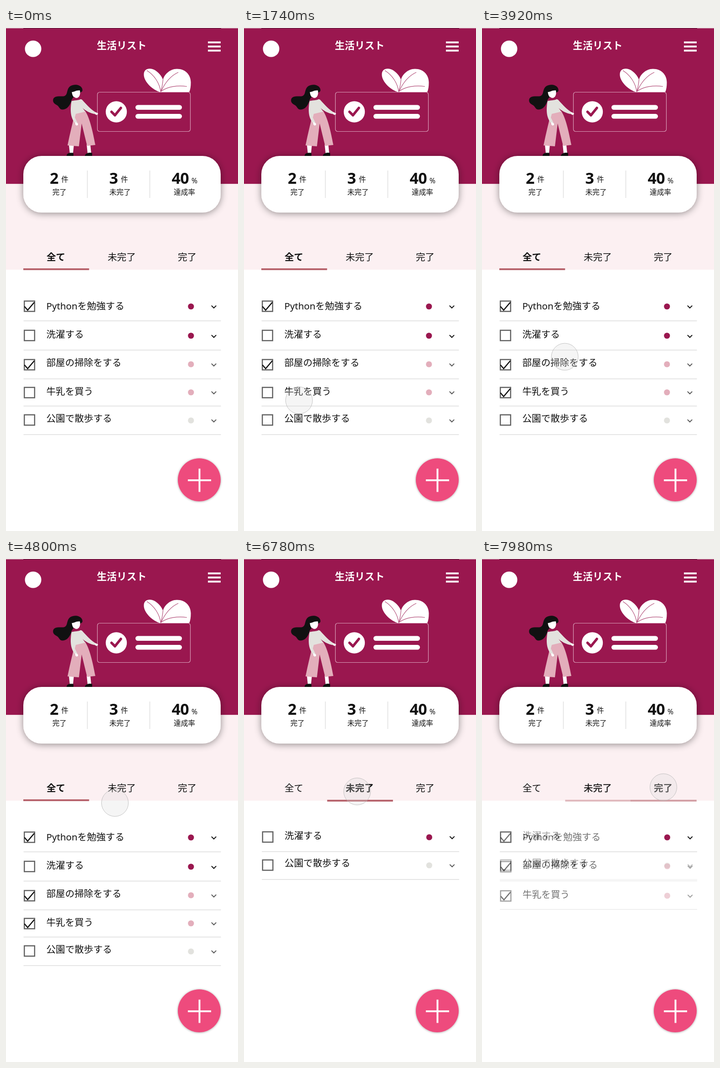
An HTML page that plays this animation: 509 px wide and 1101 px high, repeating every 8 s.

```html
<!DOCTYPE html>
<html lang="ja">
<head>
<meta charset="utf-8">
<title>生活リスト</title>
<style>
html, body { margin: 0; width: 100%; height: 100%; overflow: hidden; background: #fff; }
svg { display: block; width: 100%; height: 100%; }
text { font-family: "Noto Sans", "Noto Sans CJK JP", sans-serif; fill: #111; }
.num { font-size: 34px; font-weight: 700; letter-spacing: -.6px; }
.unit { font-size: 15.7px; }
.item { font-size: 20.6px; }
.bold { font-weight: 700; }
.title { font-size: 21.8px; font-weight: 900; fill: #fff; }
</style>
</head>
<body>
<svg viewBox="0 0 509 1101">
  <defs>
    <filter id="soft" x="-20%" y="-40%" width="140%" height="180%">
      <feDropShadow dx="0" dy="2" stdDeviation="8" flood-color="#000" flood-opacity=".42"/>
    </filter>
    <filter id="near" x="-20%" y="-20%" width="140%" height="140%">
      <feDropShadow dx="0" dy=".5" stdDeviation="2.2" flood-color="#000" flood-opacity=".38"/>
    </filter>
  </defs>

  <!-- header -->
  <rect width="509" height="341.4" fill="#9a174f"/>
  <rect y="341.4" width="509" height="187.6" fill="#fcf0f2"/>
  <rect width="509" height="1" fill="#c9a0b3"/>
  <rect x="38" width="434" height="1" fill="#511a35"/>
  <circle cx="59.5" cy="45.5" r="18" fill="#fff"/>
  <text x="199.3" y="46" class="title">生活リスト</text>
  <path d="M443 31.5h28M443 40.5h28M443 49.5h28" stroke="#fff" stroke-width="4"/>

  <!-- leaves and panel -->
  <g fill="#fff">
    <path d="M339 140.5C322 136 301 117 302.500 100C303.500 88 317 86 328 93C337 99 343 108 344.500 114C346 103 359 89.500 375 89.500C394 89.500 405.500 103 405.500 119C405.500 128 404.500 135 402 140.500Z"/>
    <path d="M309 93C325 103 337 120 339.500 140C343 128 344 120 344.500 113M339.500 140C350 117 362 104 378 97M341 138C355 128 377 125 397 128" fill="none" stroke="#b3507b" stroke-width="1.200"/>
    <rect x="200.500" y="140.500" width="204" height="86" rx="5" fill="#9a174f" stroke="#d9a0b9" stroke-width="1.200"/>
    <circle cx="242" cy="183.500" r="23.200"/>
    <rect x="284" y="168.500" width="102" height="10.500" rx="5.250"/>
    <rect x="284" y="188" width="102" height="10.500" rx="5.250"/>
  </g>
  <path d="M231.500 183.500L239 191L252 175" fill="none" stroke="#9a174f" stroke-width="5.500" stroke-linecap="round" stroke-linejoin="round"/>

  <!-- woman -->
  <path d="M138 255L140 275H147L149 255ZM177 255L179 275H187L185 255Z" fill="#fff"/>
  <path d="M133 280C133 274 139 272.500 148 273.500V280ZM173 280C174 274 181 272 189 273.500V280Z" fill="#111"/>
  <path d="M135.500 135C138 126 148 123 156 124.500C164 126 169 132 167.500 138C165 142 158 142 153 145C150 155 146 158 142 163C139 172 132 179 123 178.500C117 178 117 172 112 169C106 166 102 162 103.500 156C106 148 118 150 126 149.500C134 148 133 142 135.500 135Z" fill="#111"/>
  <path d="M144.500 140C150 140 154 136 162 136.500C164 145 161 153 154 153.500C148 153 145 147 144.500 140Z" fill="#fff"/>
  <path d="M152 184L174 182C184 198 190 225 196 256L178 258L166 209L160 259L135 257C140 232 146 208 152 184Z" fill="#e3aebb"/>
  <path d="M144 158C149 154 161 153 167 157C178 169 186 179 199 185.500L198 189C184 187 173 180 168 175L174 183L153 188L151 196L157 208L153 210C144 200 139 187 144 158Z" fill="#e3e2de"/>
  <path d="M143 160C145 154 148 151 150 151C153 155 160 153 165 155C160 159 149 158 143 160Z" fill="#9a174f"/>
  <path d="M152 206L158 209C159 214 154 215 152 211ZM195 184.500L201 186C203 188 201 191 197 190Z" fill="#fff"/>

  <!-- statistics card -->
  <rect x="38" y="280" width="433" height="124" rx="40" fill="#fff" filter="url(#soft)"/>
  <path d="M178.500 312V372M315.500 312V372" stroke="#dadada" stroke-width="1.300"/>
  <text x="96" y="341.200" class="num">2</text><text x="121.200" y="337" class="unit">件</text>
  <text x="226.500" y="341.200" class="num">3</text><text x="252" y="337" class="unit">件</text>
  <text x="363.500" y="341.200" class="num">40</text><text x="407" y="340" class="unit">%</text>
  <text x="101.700" y="364.500" class="unit">完了</text>
  <text x="226.700" y="364.500" class="unit">未完了</text>
  <text x="368" y="364.500" class="unit">達成率</text>

  <g id="views"></g>

  <!-- add button -->
  <circle cx="424" cy="989" r="47" fill="#ee4c7d" filter="url(#near)"/>
  <path d="M399 990H450M424.500 964.500V1015.500" stroke="#fff" stroke-width="4"/>

  <circle id="touch" r="29.500" fill="#dadada" fill-opacity=".27" stroke="#b4b4b4" stroke-opacity=".8"/>
</svg>
<script>
const LOOP = 8000, FADE = 410;
const WINE = '#9a174f', ROSE = '#e3aebb', GREY = '#e2e2de', INK = '#111', DIM = '#5a5a5a';
const TABS = [['全て', 89, 38, 526], ['未完了', 223, 182.5, 527], ['完了', 377, 326.5, 527]];

const study = ['Pythonを勉強する', WINE, INK];
const wash = ['洗濯する', WINE, INK];
const clean = ['部屋の掃除をする', ROSE, DIM];
const milk = ['牛乳を買う', ROSE, DIM];
const walk = ['公園で散歩する', GREY, DIM];

// x shift, then centres of box, text, dot, chevron and the rule below
function row([label, dot, ink], done, dx, box, mid, dotY, chev, rule) {
  return `<g transform="translate(${dx})">
    <rect x="40.2" y="${box - 11.3}" width="22.6" height="22.6" fill="none" stroke="#626262" stroke-width="2.5"/>
    ${done ? `<path d="M40.5 ${box + .5}L47.5 ${box + 8.5}L62 ${box - 8.5}" fill="none" stroke="${INK}" stroke-width="2.5"/>` : ''}
    <text class="item" x="88.5" y="${mid + 7.5}">${label}</text>
    <circle cx="405.8" cy="${dotY}" r="6.6" fill="${dot}"/>
    <path d="M450.8 ${chev - 2.4}l5.2 5.2l5.2 -5.2" fill="none" stroke="${ink}" stroke-width="2"/>
    <path d="M38.5 ${rule}H471.5" stroke="#dcdcdc" stroke-width="1.5"/>
  </g>`;
}

function view(active, rows) {
  const tabs = TABS.map(([label, x], i) =>
    `<text class="item${i === active ? ' bold' : ''}" x="${x}" y="509">${label}</text>`).join('');
  const [, , x, y] = TABS[active];
  return `<g><rect y="465" width="509" height="64" fill="#fcf0f2"/>
    <rect y="529" width="509" height="375" fill="#fff"/>${tabs}
    <rect x="${x}" y="${y}" width="144.3" height="4" fill="#b8656e"/>${rows.join('')}</g>`;
}

const allRows = milkDone => [
  row(study, true, 0, 609, 608.5, 609.5, 610, 641),
  row(wash, false, 0, 673, 670.5, 673.5, 674.5, 705),
  row(clean, true, 0, 737, 732.5, 736, 737, 768),
  row(milk, milkDone, 0, 798, 795, 797.5, 798, 827.5),
  row(walk, false, 0, 858, 854, 859, 859.5, 890)
];
const openRows = [
  row(wash, false, .6, 608.5, 605.5, 609, 609.5, 640.5),
  row(walk, false, .6, 670, 665.5, 670.5, 671, 701.5)
];
const doneRows = [
  row(study, true, .5, 609, 608.5, 609.5, 610, 641),
  row(clean, true, .6, 673.5, 669.5, 672.5, 674, 704.5),
  row(milk, true, .6, 737.5, 734.5, 737, 737.5, 767)
];

const stack = document.getElementById('views');
stack.innerHTML = view(0, allRows(false)) + view(0, allRows(true)) + view(1, openRows) + view(2, doneRows);
const views = [...stack.children];
const starts = [-FADE, 2850, 5470, 7770];

// touch point: time, x, y
const PATH = [
  [480, 456, -31], [1000, 359, 539], [1300, 230, 795], [1740, 121, 815], [1860, 100, 817],
  [2120, 75, 812], [2580, 43, 807], [3490, 43, 807], [3620, 64, 808], [3740, 64.5, 807.5],
  [3860, 65, 808], [3920, 181.5, 720], [4680, 236, 551], [4800, 239, 534], [5200, 243, 509],
  [6760, 243, 509], [6780, 248, 508.8], [7560, 398, 499.5]
];

const slope = (i, k) => (PATH[i + 1][k] - PATH[i][k]) / (PATH[i + 1][0] - PATH[i][0]);
function tangent(i, k) {
  if (i === 0) return slope(0, k);
  if (i === PATH.length - 1) return 0;
  const a = slope(i - 1, k), b = slope(i, k);
  return a * b <= 0 ? 0 : 2 * a * b / (a + b);
}

// monotone cubic interpolation along PATH
function along(t, k) {
  const last = PATH.length - 1;
  if (t <= PATH[0][0]) return PATH[0][k];
  if (t >= PATH[last][0]) return PATH[last][k];
  let i = 0;
  while (t >= PATH[i + 1][0]) i++;
  const h = PATH[i + 1][0] - PATH[i][0], u = (t - PATH[i][0]) / h, v = 1 - u;
  return v * v * (1 + 2 * u) * PATH[i][k] + u * u * (3 - 2 * u) * PATH[i + 1][k]
    + h * u * v * (v * tangent(i, k) - u * tangent(i + 1, k));
}

const touch = document.getElementById('touch');
function draw(t) {
  views.forEach((el, i) => {
    const u = Math.min(1, Math.max(0, (t - starts[i]) / FADE));
    el.setAttribute('opacity', u + .3 * u * (1 - u));
  });
  touch.setAttribute('cx', along(t, 1));
  touch.setAttribute('cy', along(t, 2));
}

const t0 = performance.now();
function tick() {
  draw((performance.now() - t0) % LOOP);
  requestAnimationFrame(tick);
}
tick();
</script>
</body>
</html>
```
